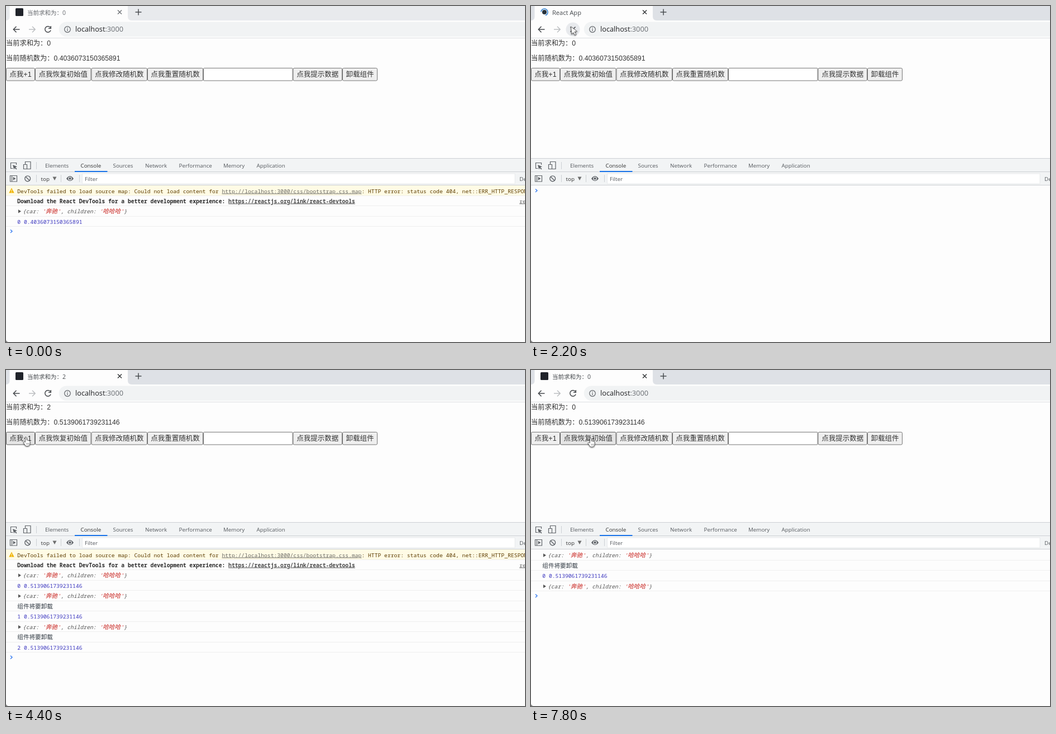
Animation, 929 px wide and 603 px high, one loop 8000 ms. Source, as an HTML page:

```html
<!DOCTYPE html>
<html lang="zh">
<head>
<meta charset="utf-8">
<title>Console demo</title>
<style>
html, body { margin: 0; width: 100%; height: 100%; overflow: hidden; background: #fdfdfd; }
svg { display: block; width: 929px; height: 603px; }
text { white-space: pre; }
.ui { font: 9.8px "Open Sans", "Noto Sans", "Noto Sans CJK SC", sans-serif; fill: #55595e; }
.page { font: 12.23px "Liberation Sans", "Noto Sans CJK SC", "Noto Sans CJK", sans-serif; fill: #333; }
.btn text { font-size: 12.5px; }
.btn rect { fill: #efefef; stroke: #767676; }
.btn.hover rect { fill: #e5e5e5; stroke: #5c5c5c; }
.btn.down rect { fill: #f5f5f5; stroke: #8d8d8d; }
.log { font: 9.7px "Noto Sans Mono", "DejaVu Sans Mono", "Noto Sans CJK SC", monospace; fill: #303942; }
.log .cjk { font-size: 10.6px; font-family: "Noto Sans CJK SC", "Noto Sans CJK", sans-serif; }
.log .link { text-decoration: underline; }
.obj { font-style: italic; fill: #565656; }
.str { fill: #c8221d; }
.line { fill: none; stroke: #5f6368; stroke-width: 1.2; }
.nav { stroke: #45484c; stroke-width: 1.5; }
</style>
</head>
<body>
<svg viewBox="0 0 929 603">
  <rect width="929" height="603" fill="#fdfdfd"/>

  <!-- tab strip and address bar -->
  <rect id="strip" width="929" height="26"/>
  <path d="M0 26Q6.500 26 6.500 19V0H218V19Q218 26 225 26Z" fill="#fdfdfd"/>
  <rect id="icon" x="17" y="4" width="14" height="14" rx="1.500" fill="#20232a"/>
  <g id="spinner">
    <circle cx="24" cy="11" r="4" fill="#26313a"/>
    <circle id="arc" cx="24" cy="11" r="6" fill="none" stroke="#2f7fd0" stroke-width="1.600" stroke-dasharray="25 12.700"/>
  </g>
  <text id="title" class="ui" x="38" y="15.500"></text>
  <path id="close" d="M200 7.500l7 7m0-7l-7 7" fill="none" stroke-width="1.400"/>
  <path d="M231.500 11h11M237 5.500v11" fill="none" stroke="#4a4d51" stroke-width="1.500"/>
  <path d="M940 28.500H108a13.200 13.200 0 0 0 0 26.400H940Z" fill="#f1f3f4"/>
  <path d="M0 57.500H929" stroke="#dddfe2"/>
  <g class="line">
    <path class="nav" d="M24.500 42H13.500M18.500 36.800L13.300 42l5.200 5.200"/>
    <path class="nav" d="M41 42h11M47 36.800L52.200 42 47 47.200" style="stroke:#bcbec1"/>
    <circle id="halo" cx="75" cy="42" r="12.500" style="fill:#e8eaed;stroke:none"/>
    <path id="reload" class="nav" d="M79.300 38.500A5.300 5.300 0 1 0 80.100 43.500M80.300 36v4.300H76"/>
    <path id="stop" class="nav" d="M70.500 37.500l9 9m0-9l-9 9"/>
    <circle cx="110" cy="42" r="5.300"/>
    <path d="M110 41.300v3.700M110 38.800v1.400"/>
  </g>
  <text class="ui" x="124" y="46.200" style="font-size:12.75px;fill:#202124">localhost<tspan fill="#6a6e73">:3000</tspan></text>

  <!-- web page -->
  <g class="page">
    <text id="sum" x="0" y="71.300"></text>
    <text id="rand" x="0" y="97.800"></text>
    <g id="buttons"></g>
    <rect x="353.500" y="111.500" width="159.500" height="22.500" rx="1" fill="#fff" stroke="#767676"/>
  </g>

  <!-- developer tools -->
  <rect y="274" width="929" height="47.500" fill="#f2f4f5"/>
  <path d="M0 273.500H929M0 297.500H929M0 321.500H929" stroke="#cdd0d4"/>
  <path d="M54.500 280v13M54.500 303v13M98.500 303v13M131.500 303v13" stroke="#cdd0d4"/>
  <rect x="123" y="296" width="58.500" height="2" fill="#1a73e8"/>
  <g class="ui" id="tabs"></g>
  <rect x="136.500" y="301" width="774.500" height="18" fill="#fff" stroke="#e4e6e8" stroke-width=".800"/>
  <g class="ui">
    <text x="62.500" y="313.500" fill="#333">top</text>
    <path d="M83.500 306.500h7l-3.500 6.500z" fill="#6e6e6e"/>
    <text x="141" y="313.700">Filter</text>
    <text x="919" y="313.500">Default levels</text>
  </g>
  <g class="line">
    <path d="M12.500 291.500H8.500V281.500H18.500V285"/>
    <path d="M12 285l8 3.200-3.200 1.300 2.700 2.700-1.200 1.200-2.700-2.700-1.300 2.800z" fill="#5f6368" stroke="none"/>
    <path id="device" d="M34.500 284.500V279.500H44V292.500H38M31.500 284.500H37.500V292.500H31.500Z"/>
    <path d="M7.500 304.500H19.500V315H7.500ZM10.500 304.500V315"/>
    <path d="M12.700 306.800l4.800 3-4.800 3z" fill="#5f6368" stroke="none"/>
    <circle cx="38.700" cy="309.800" r="4.900" stroke-width="1.400"/>
    <path d="M35.300 306.400l6.800 6.800" stroke-width="1.400"/>
    <path d="M108 309.700Q114.500 301 121 309.700 114.500 318.400 108 309.700Z" fill="#5f6368" stroke="none"/>
    <circle cx="114.500" cy="309.700" r="2.700" fill="#5f6368" stroke="#f2f4f5"/>
  </g>
  <g id="console" class="log"></g>
  <g id="tip">
    <rect id="tipBox" fill="#f4f4f4" stroke="#c6c6c6" style="filter:drop-shadow(1px 1px 1px #0003)"/>
    <text id="tipText" class="ui"></text>
  </g>
  <path d="M0 599Q.500 602.500 4 603H0Z" fill="#777"/>

  <!-- pointer, drawn around its centre -->
  <g id="pointer" style="filter:drop-shadow(.6px 1.5px 1px #0008)" stroke="#666" stroke-width=".900" stroke-linejoin="round">
    <path id="arrow" d="M-5-7L6 1.500 1.500 2.500 4.500 7 2 8.300-.800 3.700-3.800 6.500Z" fill="#f4f4f4"/>
    <g id="hand">
      <path d="M-2.500 1V-7Q-1.200-9 0-7V-2.500Q1.300-3.500 2.200-2 3.500-2.800 4.200-1.300 5.800-2 6 0V4Q5.500 8 2 8H-.500Q-3 7.500-4 4.500L-6 1.500Q-5.500-.500-4 .500Z" fill="#fff"/>
      <path d="M0 2.500v3M2 2.500v3M4 2.500v3" fill="none" stroke-width=".700"/>
    </g>
  </g>
</svg>

<script>
const LOOP = 8000, STEP = 100;
const $ = id => document.getElementById(id);
const show = (id, on) => $(id).style.display = on ? '' : 'none';

// label, left, right
const buttons = [['点我+1', 0, 52], ['点我恢复初始值', 52, 152.5], ['点我修改随机数', 152.5, 253],
  ['点我重置随机数', 253, 353], ['点我提示数据', 513.5, 602], ['卸载组件', 602, 665]];
$('buttons').innerHTML = buttons.map(([label, l, r]) =>
  `<g class="btn"><rect x="${l + .5}" y="111.5" width="${r - l - 1}" height="22.5" rx="2"/>` +
  `<text x="${(l + r) / 2}" y="127" text-anchor="middle">${label}</text></g>`).join('');
const buttonNodes = document.querySelectorAll('.btn');

const tabs = [['Elements', 70], ['Console', 133.5], ['Sources', 191.5], ['Network', 249],
  ['Performance', 309.5], ['Memory', 389], ['Application', 448.5]];
$('tabs').innerHTML = tabs.map(([label, x]) =>
  `<text x="${x}" y="290"${label === 'Console' ? ' fill="#333"' : ''}>${label}</text>`).join('');

// Value of the last [time, value] entry that has been reached
const at = (list, t) => list.filter(e => e[0] <= t).pop()[1];

const counts = [[0, 0], [3800, 1], [4200, 2], [5000, 3], [7100, 0]];
const titleCounts = [[0, 0], [4000, 1], [4400, 2], [5300, 3], [7300, 0]];
const randoms = [[0, '0.4036073150365891'], [2400, '0.5139061739231146']];
const presses = [3800, 4200, 5000, 7100, 7600];

// time, x, y
const path = [[0, 960, 46], [100, 915, 48], [300, 570, 51], [500, 310, 51], [700, 120, 57], [900, 76.5, 44],
  [2900, 76.5, 44], [3200, 60, 86], [3500, 37, 128.5], [5600, 37, 128.5], [5700, 38, 185], [5800, 38, 254],
  [5900, 40.5, 318], [6400, 40.5, 318], [6500, 75, 221], [6600, 80, 171], [6700, 90, 148],
  [6800, 106.5, 131.5], [6900, 108, 130], [LOOP, 108, 130]];

function pointerAt(t) {
  const i = path.findIndex(p => p[0] > t), a = path[i - 1], b = path[i];
  const k = (t - a[0]) / (b[0] - a[0]);
  return [a[1] + (b[1] - a[1]) * k, a[2] + (b[2] - a[2]) * k];
}

const cjk = s => `<tspan class="cjk">${s}</tspan>`;
const str = s => `<tspan class="str">'${cjk(s)}'</tspan>`;
const link = (s, color) => `<tspan class="link" fill="${color}">${s}</tspan>`;
const line = (y, body, attrs = '') => `<text x="20.300" y="${y + 3.5}" ${attrs}>${body}</text>`;

const warn = y => `<rect y="322" width="929" height="18.500" fill="#fffbe5"/>` +
  `<path d="M10 326.500l4.700 9H5.300z" fill="#f0b400"/><path d="M10 329.500v3M10 333.300v1.200" stroke="#fff"/>` +
  line(y, 'DevTools failed to load source map: Could not load content for ' +
    link('http://localhost:3000/css/bootstrap.css.map', '#6b6b66') +
    ': HTTP error: status code 404, net::ERR_HTTP_RESPONSE_CODE_FAILURE', 'fill="#5c3c00"');
const hint = y => line(y, 'Download the React DevTools for a better development experience: ' +
  link('https://reactjs.org/link/react-devtools', '#4a4a4a'), 'font-weight="bold" fill="#2b2b2b"') +
  `<text class="link" x="919" y="${y + 3.5}" fill="#666">react-dom</text>`;
const props = y => `<path d="M22 ${y - 3.2}l5 3.200-5 3.200z" fill="#555"/>` +
  `<text class="obj" x="30" y="${y + 3.5}">{car: ${str('奔驰')}, children: ${str('哈哈哈')}}</text>`;
const cleanup = y => line(y, cjk('组件将要卸载'));
const values = (n, r) => y => line(y, `${n} ${r}`, 'fill="#3b36bf"');

function rowsAt(t) {
  const r = at(randoms, t);
  const update = n => [props, cleanup, values(n, r)];
  const boot = [warn, hint, props, values(0, r)];
  if (t < 1100) return boot;
  if (t < 2400) return [];
  if (t < 6300) {
    const done = counts.filter(c => c[1] && c[0] <= t);
    return boot.concat(...done.map(c => update(c[1])));
  }
  if (t < 7100) return [];
  return t < 7700 ? update(0) : [...update(0), props];
}

function drawConsole(t) {
  const rows = rowsAt(t), warned = rows[0] === warn;
  let y = 314, html = '';
  rows.forEach((row, i) => {
    y = warned ? (i ? 350 + 18.55 * (i - 1) : 332) : 332.5 + 18.55 * i;
    html += row(y) + `<path d="M0 ${Math.round(y + 8) + .5}H929" stroke="#efefef"/>`;
  });
  const p = y + 17.2;
  $('console').innerHTML = html +
    `<path d="M8 ${p - 2.8}l3 2.800-3 2.800" fill="none" stroke="#367cf1" stroke-width="1.400"/>`;
}

function drawTip(t) {
  const device = t >= 5900 && t < 6000, clear = t >= 6000 && t < 6400;
  show('tip', device || clear);
  $('device').style.stroke = device ? '#222' : '';
  const [x, y, w, h, label, keys] = device
    ? [27, 299, 188, 22, 'Toggle device toolbar', 'Ctrl + Shift + M'] : [22, 324, 124, 22, 'Clear console', 'Ctrl + L'];
  Object.entries({ x: x + .5, y: y + .5, width: w - 1, height: h - 1 }).forEach(([k, v]) => $('tipBox').setAttribute(k, v));
  $('tipText').innerHTML = `<tspan x="${x + 7}" y="${y + 15}" fill="#505357">${label}</tspan>` +
    `<tspan x="${x + w - 7}" text-anchor="end" fill="#808387" style="font-size:9.3px">${keys}</tspan>`;
}

function draw(t) {
  const active = t >= 1000, loading = t >= 1000 && t < 2800;
  $('strip').setAttribute('fill', active ? '#dee1e6' : '#e8eaed');
  $('close').setAttribute('stroke', active ? '#2d3033' : '#6d7075');
  show('icon', !loading);
  show('spinner', loading);
  $('arc').setAttribute('transform', `rotate(${(t - 1500) / 800 * 360 - 130} 24 11)`);

  const blank = t >= 1900 && t < 2900;
  $('title').textContent = blank ? 'React App' : '当前求和为：' + at(titleCounts, t);
  $('title').style.fontSize = blank ? '11.1px' : '10.5px';
  $('title').style.fill = active ? '#45494d' : '#66696e';
  $('sum').textContent = '当前求和为：' + at(counts, t);
  $('rand').textContent = '当前随机数为：' + at(randoms, t);

  const [x, y] = pointerAt(t);
  const onRow = y > 111 && y < 135;
  const pressed = presses.includes(t);
  buttonNodes.forEach((node, i) => {
    const over = onRow && x >= buttons[i][1] && x < buttons[i][2];
    node.classList.toggle('hover', over && !pressed);
    node.classList.toggle('down', over && pressed);
  });
  show('halo', Math.hypot(x - 75, y - 42) < 14);
  show('stop', t >= 1900 && t < 2800);
  show('reload', t < 1900 || t >= 2800);
  const hand = onRow || y > 290;
  show('hand', hand);
  show('arrow', !hand);
  show('pointer', t >= 100);
  $('pointer').setAttribute('transform', `translate(${x} ${y})`);

  drawConsole(t);
  drawTip(t);
}

const start = performance.now();
let last = -1;
function tick() {
  const t = Math.floor((performance.now() - start) % LOOP / STEP) * STEP;
  if (t !== last) draw(last = t);
  requestAnimationFrame(tick);
}
tick();
</script>
</body>
</html>
```
